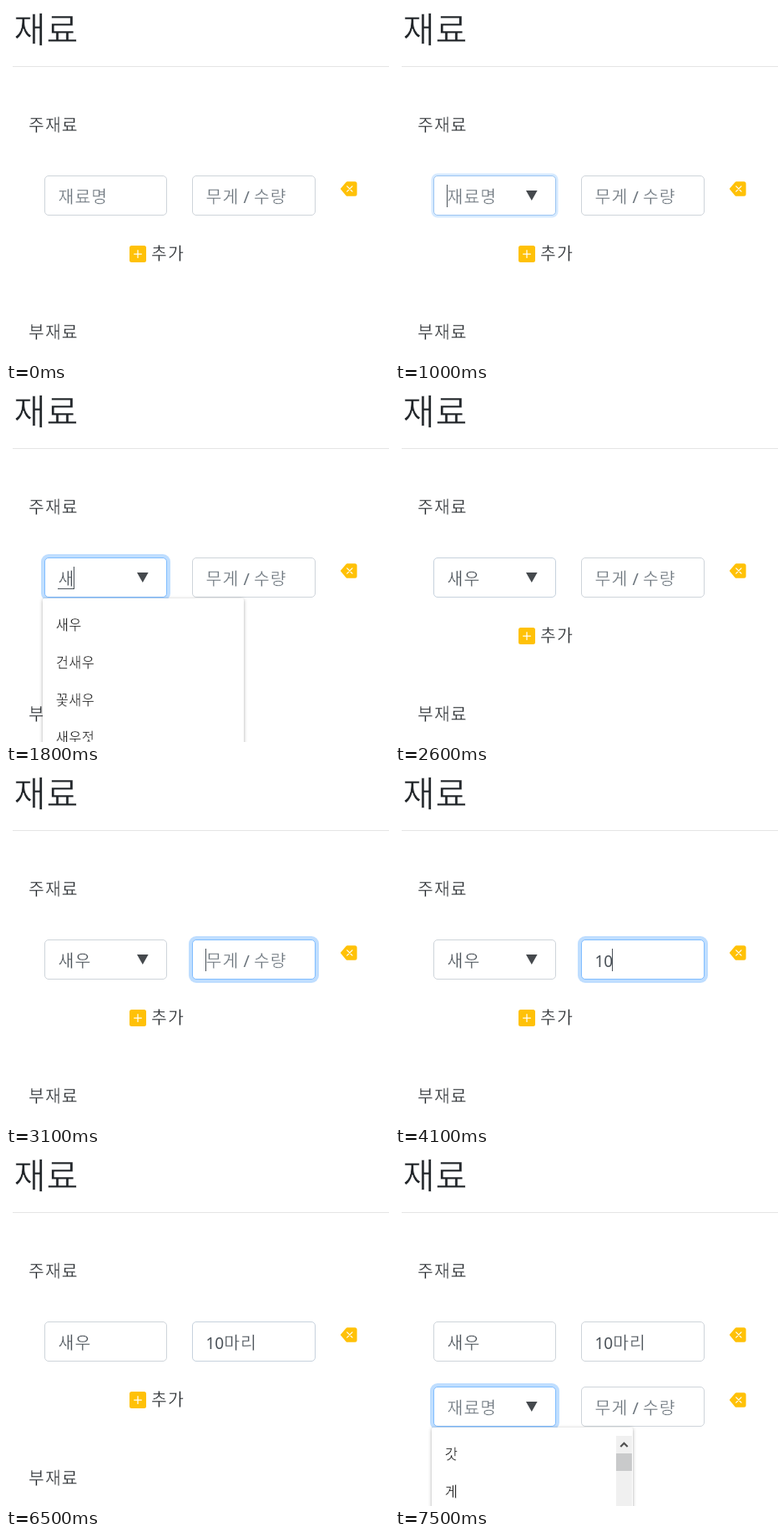
These frames come from a looping animation (459x424 px, 8 s). An HTML page:

```html
<!DOCTYPE html>
<html lang="ko">
<head>
<meta charset="utf-8">
<style>
  html, body { margin: 0; width: 100%; height: 100%; overflow: hidden; background: #fff; }
  svg { display: block; }
  /* the white outline thins the strokes of the regular weight */
  text { font-family: "Noto Sans CJK KR", "Noto Sans CJK", "Noto Sans", sans-serif; font-size: 20.5px; letter-spacing: .95px; font-weight: 350; fill: #212529; stroke: #fff; stroke-width: .4px; white-space: pre; }
  .title { font-size: 41.5px; letter-spacing: 1px; stroke-width: .7px; }
  .item { font-size: 16.5px; letter-spacing: .4px; fill: #111; }
  .value { fill: #495057; }
  .hint { fill: #6c757d; }
  .num { font-family: "Noto Sans", "Open Sans", sans-serif; font-size: 19px; letter-spacing: 0; font-weight: 400; stroke: none; }
  .slash { font-size: 20px; }
  .popup { filter: drop-shadow(0 1px 2px rgba(0, 0, 0, .32)); }
</style>
</head>
<body>
<svg id="stage" width="459" height="424" viewBox="0 0 459 424"></svg>
<script>
const stage = document.getElementById('stage');
const LOOP = 8000, STEP = 100, ROW = 78;
const HANGUL = 19.8, DIGIT = 10.8;
const AMBER = '#ffc107';

// What each field holds: [start, text, number of trailing characters being composed]
const nameTyping = [[0, '', 0], [1500, 'ㅅ', 1], [1700, '새', 1], [1900, '생', 1], [2000, '새우', 1], [2500, '새우', 0]];
const amountTyping = [[0, '', 0], [3500, '1', 0], [3800, '10', 0], [4300, '10ㅁ', 1], [4500, '10마', 1],
  [4600, '10말', 1], [4700, '10마리', 1], [5400, '10마리', 0]];

const within = (t, a, b) => t >= a && t < b;
const at = (list, t) => list.filter(e => e[0] <= t).pop();
const clamp = v => Math.max(0, Math.min(1, v));
const mix = (a, b, p) => a + (b - a) * p;

// The CSS "ease" curve, cubic-bezier(.25, .1, .25, 1)
function ease(x) {
  let lo = 0, hi = 1;
  for (let i = 0; i < 24; i++) {
    const s = (lo + hi) / 2, u = 1 - s;
    if (.75 * u * u * s + .75 * u * s * s + s ** 3 < x) lo = s; else hi = s;
  }
  const s = lo, u = 1 - s;
  return .3 * u * u * s + 3 * u * s * s + s ** 3;
}
const focus = (t, on, off) => ease(clamp((t - on) / 150)) - ease(clamp((t - off) / 150));

const label = (x, y, s, cls = '') => `<text x="${x}" y="${y}" class="${cls}">${s}</text>`;
const box = (x, y, w, h, attrs) => `<rect x="${x}" y="${y}" width="${w}" height="${h}" ${attrs}/>`;
const advance = s => [...s].reduce((sum, c) => sum + (/\d/.test(c) ? DIGIT : HANGUL), 0);

function field(x, y, w, hint, o) {
  const p = o.focus || 0, [, value, composing] = o.typed || [0, '', 0];
  const tx = x + 16, base = y + 32.6, spread = 4 * p;
  const border = [[206, 128], [212, 189], [218, 255]].map(([a, b]) => Math.round(mix(a, b, p)));
  let out = '';
  if (p > 0.01) {
    out += box(x - spread, y - spread, w + 2 * spread, 48 + 2 * spread,
      `rx="${5 + spread}" fill="rgb(0,123,255)" fill-opacity="${.25 * p}"`);
  }
  out += box(x + .5, y + .5, w - 1, 47, `rx="4.5" fill="#fff" stroke="rgb(${border})"`);
  if (value) {
    const digits = value.match(/^\d*/)[0], rest = value.slice(digits.length);
    if (digits) out += label(tx + .5, base, digits, 'num value');
    if (rest) out += label(tx + .6 + advance(digits), base, rest, 'value');
  } else {
    out += label(tx + .6, base, hint, 'hint');
  }
  const end = Math.round(tx + advance(value) - (value ? .6 : 0));
  if (composing) out += box(end - 19, y + 37, 19, 1, 'fill="#495057"');
  if (o.caret) out += box(end, y + 11, 1, 27, 'fill="#495057"');
  if (o.arrow) out += `<path d="M${x + 111} ${y + 18}h13.6l-6.8 12z" fill="#45494d"/>`;
  return out;
}

const eraser = y => `<g transform="translate(401 ${y + 6}) scale(1.25)">
  <path fill="${AMBER}" d="M15.7 3a2 2 0 0 0-2-2H6.6a2 2 0 0 0-1.5.7L.24 7.35a1 1 0 0 0 0 1.3L5.1 14.3a2 2 0 0 0 1.5.7h7.1a2 2 0 0 0 2-2z"/>
  <path stroke="#fff" stroke-linecap="round" d="M6.2 5.5l5 5m0-5l-5 5"/></g>`;

const addButton = y => `<g transform="translate(148 ${y}) scale(1.25)">
  <rect width="16" height="16" rx="2" fill="${AMBER}"/>
  <path stroke="#fff" stroke-linecap="round" d="M8 4.5v7M4.5 8h7"/></g>` + label(174.1, y + 16.5, '추가');

const row = (y, name, amount) =>
  field(46, y, 147, '재료명', name) +
  field(223, y, 148, '무게<tspan class="num slash hint"> / </tspan>수량', amount) + eraser(y);

function popup(y, items, scrolls) {
  let out = box(44, y, 241, 220, 'rx="2" fill="#fff" class="popup"');
  items.forEach((s, i) => {
    out += label(59.7, y + 38.3 + 45 * i, s, 'item');
  });
  if (scrolls) {
    out += box(265, y + 10, 19, 210, 'fill="#f0f0f0"') + box(265, y + 31, 19, 21, 'fill="#c9cacb"') +
      `<path d="M270.3 ${y + 23}l4.2-4.2 4.2 4.2" fill="none" stroke="#505050" stroke-width="2.2"/>`;
  }
  return out;
}

function scene(t) {
  const top = 203, added = t >= 6600, shift = added ? ROW : 0;
  let out = label(9.2, 43.6, '재료', 'title') +
    box(8, 72, 451, 1, 'fill="#e5e5e5"') +
    label(27.1, 150, '주재료') + label(27.1, 398 + shift, '부재료') + addButton(287 + shift);
  out += row(top, {
    focus: focus(t, 944, 2505),
    typed: at(nameTyping, t),
    caret: within(t, 900, 2500),
    arrow: within(t, 500, 6200)
  }, {
    focus: focus(t, 2950, 6405),
    typed: at(amountTyping, t),
    caret: within(t, 3000, 5200) || within(t, 5400, 6000)
  });
  if (added) {
    out += row(top + ROW, { focus: focus(t, 6950, LOOP + 1), caret: within(t, 7000, 7500), arrow: true }, {});
  }
  if (within(t, 1700, 2500)) out += popup(252, ['새우', '건새우', '꽃새우', '새우젓']);
  if (t >= 7000) out += popup(252 + ROW, ['갓', '게'], true);
  return out;
}

let shown = -1;
function update(now) {
  const t = Math.floor(now % LOOP / STEP) * STEP;
  if (t !== shown) stage.innerHTML = scene(shown = t);
}
function tick(now) {
  update(now);
  requestAnimationFrame(tick);
}
update(0);
requestAnimationFrame(tick);
</script>
</body>
</html>
```
